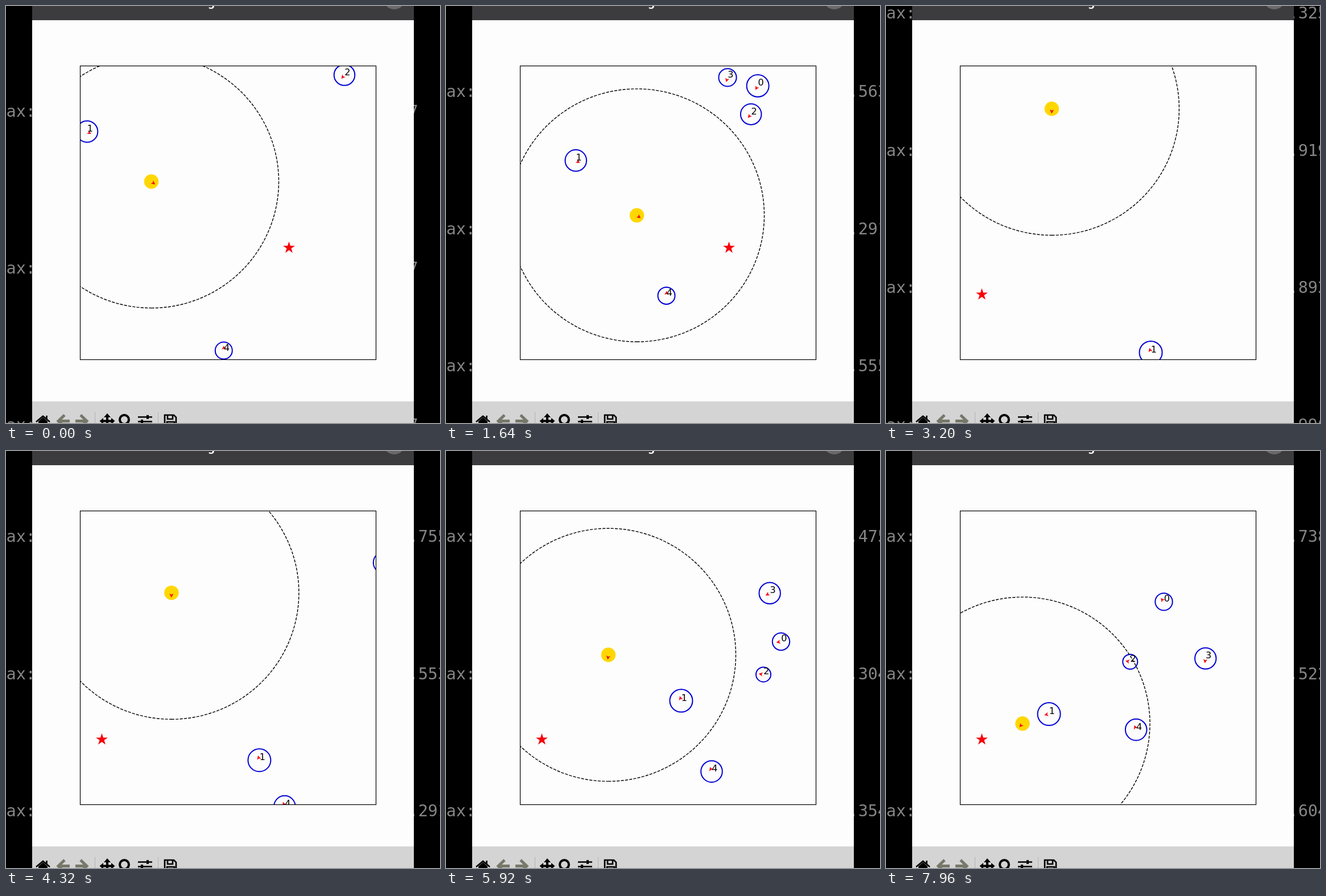
Animation, 763 px wide and 734 px high, one loop 8 s. Source, as an HTML page:

```html
<!DOCTYPE html>
<html lang="en">
<head>
<meta charset="utf-8">
<title>Robot navigation</title>
<style>
  html, body { margin: 0; width: 100%; height: 100%; overflow: hidden; background: #000; }
  svg { display: block; width: 763px; height: 734px; }
  .log { font: 28.5px "DejaVu Sans Mono", monospace; fill: #858585; white-space: pre; }
  .title { font: bold 19px "Noto Sans", sans-serif; fill: #fff; }
  .label { font: 16px "DejaVu Sans", sans-serif; fill: #000; }
  .ring { fill: none; stroke: #0000d4; stroke-width: 2; }
  .arrow, .star { fill: #f8000a; }
  .icon { fill: none; stroke: #000; stroke-width: 4; }
  .icon.thin { stroke-width: 2.6; }
  .icon.off { stroke: #77776a; stroke-width: 5; }
</style>
</head>
<body>
<svg viewBox="0 0 763 734">
  <defs>
    <clipPath id="plot"><rect x="130.5" y="105.5" width="520" height="517"/></clipPath>
  </defs>
  <rect width="763" height="734"/>
  <g id="log" class="log"></g>

  <rect x="46" width="671" height="734" fill="#fdfdfd"/>
  <rect x="46" width="671" height="25" fill="#3c3c3e"/>
  <text class="title" x="377" y="0" text-anchor="middle">Figure 1</text>
  <circle cx="682.5" cy="-13" r="19" fill="#696969"/>

  <rect x="46" y="696" width="671" height="38" fill="#d4d4d4"/>
  <path d="M156.5 715V734M267.5 715V734" stroke="#b4b4b4"/>
  <path d="M57 734V731L65 724L73 731V734Z"/>
  <path d="M53 732L65 722L77 732M71.5 721V727" class="icon thin"/>
  <path d="M103 720L92 730.5L103 741M92 730.5H112" class="icon off"/>
  <path d="M131 720L142 730.5L131 741M142 730.5H122" class="icon off"/>
  <path d="M178 720V740M167 730.5H189" class="icon"/>
  <path d="M178 717L184 724H172ZM164.5 730.5L171 725V736ZM191.5 730.5L185 725V736Z"/>
  <circle cx="208" cy="728" r="8" class="icon"/>
  <path d="M232 723.5H257M232 731.5H257" class="icon thin"/>
  <path d="M247 720H251V727H247ZM237 728H241V735H237Z"/>
  <path d="M279 740V720H295L299 724V740M284 720V727H293V720M283 740V732H296V740" class="icon thin"/>

  <g clip-path="url(#plot)">
    <g transform="translate(.5 .5)">
      <path id="star" class="star"/>
      <g id="actors"></g>
      <path id="range" fill="none" stroke="#000" stroke-width="1.4" stroke-dasharray="5.14 2.22"
        d="M0 222.6A224 222.6 0 0 0 0 -222.6A224 222.6 0 0 0 0 222.6"/>
    </g>
  </g>
  <rect x="130.5" y="105.5" width="520" height="517" fill="none" stroke="#000" stroke-width="1.2"/>
</svg>
<script>
const LOOP = 8000, STEP = 40, RESET = 2960;
const SVG = 'http://www.w3.org/2000/svg';
const byId = id => document.getElementById(id);

// Headings are in degrees, clockwise from right; times in ms.
const turn = (at, span, by, power = 1) => t =>
  by * Math.min(1, Math.max(0, (t - at) / span)) ** power;

const mover = (x, y, heading, { r, speed = 1, turns = [] } = {}) => ({ x, y, heading, r, speed, turns });

const scenes = [
  {
    start: 0,
    star: [497, 425],
    robot: mover(255, 308.5, 36.6),
    agents: [
      mover(599, 54.5, 121, { r: 19.5 }),
      mover(142, 220.5, 30.7, { r: 18.8 }),
      mover(594.5, 121, 130.4, { r: 18.3, speed: 0.91 }),
      mover(523, 35, 107.5, { r: 15.6, speed: 0.95 }),
      mover(382.3, 606, -87.2, { r: 15, speed: 0.97 })
    ]
  },
  {
    start: RESET,
    star: [168, 507.3],
    robot: mover(291, 165.8, 90.4, { turns: [turn(4320, 3640, 38, 2)] }),
    agents: [
      mover(778.3, 301.5, 170, { r: 15.2, turns: [turn(5920, 1080, 62)] }),
      mover(469.3, 623.4, 253, { r: 20, turns: [turn(5920, 80, -85)] }),
      mover(747.4, 426.1, 189.9, { r: 13 }),
      mover(736.6, 155.1, 150.6, { r: 18.7, turns: [turn(6180, 100, -95), turn(6600, 400, 43)] }),
      mover(506.8, 672, 249.6, { r: 18.8, speed: 0.6 })
    ]
  }
];

// Pixels per ms; the simulation runs a little faster midway.
const pace = t => t >= 4240 && t < 6800 ? 0.0684 : 0.0608;
const headingAt = (m, t) => m.turns.reduce((sum, by) => sum + by(t), m.heading);

function positionAt(m, start, end) {
  let { x, y } = m;
  for (let t = start; t < end; t += STEP) {
    const a = headingAt(m, t + STEP / 2) * Math.PI / 180;
    const d = pace(t) * m.speed * STEP;
    x += d * Math.cos(a);
    y += d * Math.sin(a);
  }
  return [x, y];
}

function add(parent, tag, attrs, text = '') {
  const el = document.createElementNS(SVG, tag);
  for (const k in attrs) el.setAttribute(k, attrs[k]);
  el.textContent = text;
  return parent.appendChild(el);
}

function makeActor(label) {
  const g = add(byId('actors'), 'g', {});
  const body = add(g, 'circle', label === '' ? { r: 12.7, fill: '#ffd700' } : { class: 'ring' });
  const arrow = add(g, 'path', { class: 'arrow', d: 'M8.5 0L1.5 -3.6L3.2 0L1.5 3.6Z' });
  add(g, 'text', { class: 'label', x: 0.3, y: 0 }, label);
  return { g, body, arrow };
}

function place(actor, m, start, t) {
  const at = `translate(${positionAt(m, start, t).join(' ')})`;
  actor.g.setAttribute('transform', at);
  actor.arrow.setAttribute('transform', `rotate(${headingAt(m, t)})`);
  if (m.r) actor.body.setAttribute('r', m.r);
  return at;
}

function starPath(cx, cy) {
  const points = Array.from({ length: 10 }, (_, i) => {
    const r = i % 2 ? 4.2 : 11, a = (i / 5 - 0.5) * Math.PI;
    return `${cx + r * Math.cos(a)} ${cy + r * Math.sin(a)}`;
  });
  return `M${points.join('L')}Z`;
}

function reading(step) {
  const n = Math.sin(step * 127.1 + 311.7) * 43758.5453;
  return String(Math.floor((n - Math.floor(n)) * 1000)).padStart(3, '0');
}

const rows = Array.from({ length: 4 }, () => ({
  left: add(byId('log'), 'text', { x: 0.5 }, 'ax:'),
  right: add(byId('log'), 'text', { x: 707.5 })
}));

// Log lines are 34.5px high; a reading repeats every seven or eight lines.
function drawLog(t) {
  const line = 34.5, opening = t < 200, scrolled = t >= RESET && t < 3800;
  const top = 160 + line * (opening ? 1 : scrolled ? -4 : 0);
  const gap = line * (opening ? 8 : 7);
  rows.forEach(({ left, right }, i) => {
    const y = top + i * gap;
    left.setAttribute('y', y);
    right.setAttribute('y', y);
    right.textContent = opening ? '   7' : '.' + reading(t / STEP + i);
  });
}

const robot = makeActor('');
const agents = [0, 1, 2, 3, 4].map(makeActor);

function draw(t) {
  const scene = scenes[t < RESET ? 0 : 1];
  byId('star').setAttribute('d', starPath(...scene.star));
  byId('range').setAttribute('transform', place(robot, scene.robot, scene.start, t));
  scene.agents.forEach((m, i) => place(agents[i], m, scene.start, t));
  drawLog(t);
}

const begin = performance.now();
function tick() {
  const t = (performance.now() - begin) % LOOP;
  draw(Math.floor(t / STEP) * STEP);
  requestAnimationFrame(tick);
}
tick();
</script>
</body>
</html>
```
